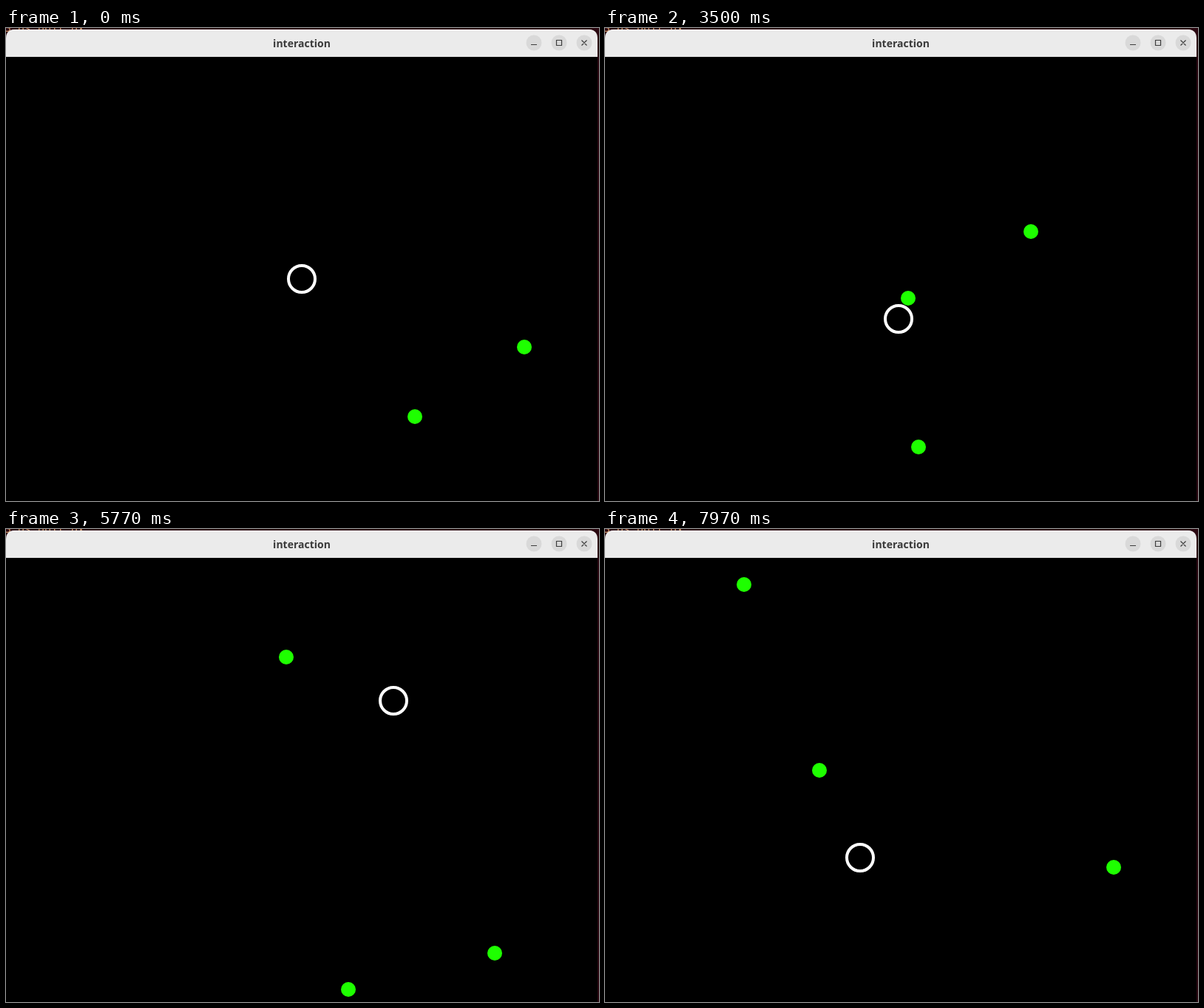
An HTML page that plays this animation: 802x639 px, repeating every 8 s.

```html
<!DOCTYPE html>
<html lang="en">
<head>
<meta charset="utf-8">
<title>interaction</title>
<style>
  html, body { margin: 0; width: 100%; height: 100%; overflow: hidden; background: #2a0710; }
  svg { display: block; width: 802px; height: 639px; }
  .terminal { font: 15px "Noto Sans Mono", monospace; fill: #d8a070; }
  .title { font: bold 14px "Noto Sans", sans-serif; fill: #3a3a3a; text-anchor: middle; }
  .button { fill: #d9d9d9; }
  .icon { fill: none; stroke: #3d3d3d; stroke-width: 1.2; }
  .ball { fill: #1eff00; }
  .ring { fill: none; stroke: #fff; stroke-width: 4; }
</style>
</head>
<body>
<svg viewBox="0 0 802 639">
  <rect width="802" height="639" fill="#2a0710"/>
  <text class="terminal" x="-2" y="5">3 us unit ux</text>
  <path d="M0 39V14Q0 2 12 2H788Q800 2 800 14V39Z" fill="#ebebeb"/>
  <path d="M5 4.5Q8 2.5 12 2.5H788Q792 2.5 795 4.5" fill="none" stroke="#f7f7f7"/>
  <rect y="39" width="800" height="600"/>
  <text class="title" x="400" y="26">interaction</text>
  <g class="button">
    <circle cx="714" cy="20" r="10.5"/>
    <circle cx="748" cy="20" r="10.5"/>
    <circle cx="782" cy="20" r="10.5"/>
  </g>
  <path class="icon" d="M710 22.5h8M744.5 16.5h7v7h-7zM778.5 16.5l7 7m0-7l-7 7"/>
  <circle class="ball" id="drifter" r="10"/>
  <circle class="ball" id="striker" r="10"/>
  <circle class="ball" id="newcomer" r="10"/>
  <circle class="ring" id="player" r="18"/>
</svg>
<script>
  const LOOP = 8000, STEPS = 240;
  const STOP = 25, SPAWN = 88, HIT = 105;

  // The hand-steered ring passes these points: [step, x, y].
  const steering = [[0, 400, 339], [24, 400, 339], [29, 391, 329], [50, 358, 292],
    [67, 240, 310], [90, 450, 480], [HIT, 397, 393], [149, 382, 264],
    [173, 524, 232], [212, 485, 514], [224, 478, 517], [239, 345, 444]];

  function slope(i, axis) {
    const a = steering[Math.max(i - 1, 0)];
    const b = steering[Math.min(i + 1, steering.length - 1)];
    return (b[axis] - a[axis]) / (b[0] - a[0]);
  }

  // Cubic Hermite curve through the steering points.
  function steer(step, axis) {
    const next = Math.max(1, steering.findIndex(point => point[0] >= step));
    const a = steering[next - 1], b = steering[next];
    const span = b[0] - a[0], u = (step - a[0]) / span, v = 1 - u;
    return v * v * (1 + 2 * u) * a[axis] + u * u * (3 - 2 * u) * b[axis]
      + span * u * v * (v * slope(next - 1, axis) - u * slope(next, axis));
  }

  // Reflects a straight path between two walls.
  function bounce(value, low, high) {
    const size = high - low, period = 2 * size;
    const offset = ((value - low) % period + period) % period;
    return low + Math.min(offset, period - offset);
  }

  function place(id, x, y) {
    const node = document.getElementById(id);
    node.setAttribute("cx", Math.round(x));
    node.setAttribute("cy", Math.round(y));
    return node;
  }

  function roll(id, steps, x, y, vx, vy) {
    return place(id, bounce(x + vx * steps, 10, 790), bounce(y + vy * steps, 49, 629));
  }

  function draw(now) {
    const step = Math.floor((now % LOOP) * STEPS / LOOP + 0.15) % STEPS;

    roll("drifter", step, 701, 431, 2.89, -1.49);
    roll("newcomer", step - HIT, 424, 566, 3.4925, 1.754)
      .style.display = step < SPAWN ? "none" : "";

    // The striker stops at the resting ring and is later knocked away by it.
    if (step < HIT) roll("striker", Math.min(step - STOP, 0), 410, 365, -5.72, -6.4);
    else roll("striker", step - HIT, 410, 365, -12.54, -13.08);

    place("player", steer(step, 1), steer(step, 2));
  }

  const start = performance.now();
  function tick() {
    draw(performance.now() - start);
    requestAnimationFrame(tick);
  }
  tick();
</script>
</body>
</html>
```
